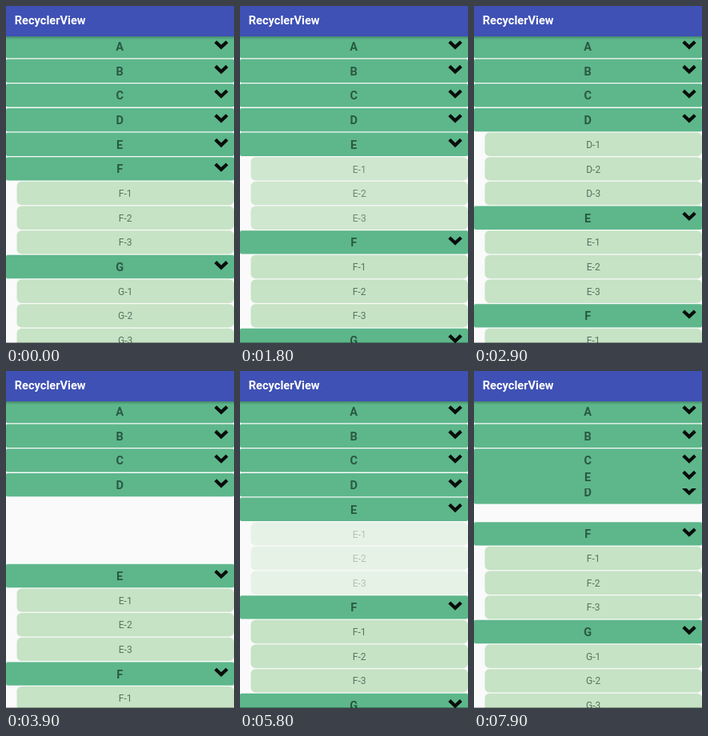
These frames come from a looping animation (285x422 px, 8000 ms). An HTML page with a canvas:

```html
<!DOCTYPE html>
<html lang="en">
<head>
<meta charset="utf-8">
<title>RecyclerView</title>
<style>
  html, body { margin: 0; width: 100%; height: 100%; overflow: hidden; background: #fafafa; }
  canvas { display: block; width: 285px; height: 422px; }
</style>
</head>
<body>
<canvas id="stage" width="285" height="422"></canvas>
<script>
const ctx = document.getElementById('stage').getContext('2d');
const W = 285, H = 422, LOOP = 8000, STEP = 100;
const FIRST = 35.9, PITCH = 30.66, ROW = 29.4;
const MOVE = 250, FADE = 120;
const NAMES = 'ABCDEFGH';

// Groups toggled over time; lead is how far the animation is when first seen
const toggles = [
  { at: 1500, group: 4, open: true, lead: 37 },
  { at: 2500, group: 3, open: true, lead: 69 },
  { at: 3900, group: 3, open: false, lead: 170 },
  { at: 5800, group: 4, open: false, lead: 70 },
];
const DRAG_START = 7700, SWAP_START = 7807;

const clamp = v => Math.max(0, Math.min(1, v));
const ease = v => 0.5 - Math.cos(Math.PI * clamp(v)) / 2;

// Opening: rows move, then children fade in. Closing: children fade out, then rows move.
function groupState(group, t) {
  let state = { space: group >= 5 ? 1 : 0, alpha: group >= 5 ? 1 : 0 };
  for (const e of toggles) {
    if (e.group !== group || t < e.at) continue;
    const p = t - e.at + e.lead;
    state = e.open
      ? { space: ease(p / MOVE), alpha: ease((p - MOVE) / FADE) }
      : { space: 1 - ease((p - FADE) / MOVE), alpha: 1 - ease(p / FADE) };
  }
  return state;
}

function box(x, y, w, h, radius, fill) {
  ctx.fillStyle = fill;
  ctx.beginPath();
  ctx.roundRect(x, y, w, h, radius);
  ctx.fill();
}

function label(text, x, y, font, fill, align = 'center') {
  ctx.font = font + ' Roboto, sans-serif';
  ctx.fillStyle = fill;
  ctx.textAlign = align;
  ctx.fillText(text, x, y);
}

function header(name, y) {
  box(0, y, W, ROW, 2, '#5db78b');
  label(name, 142.2, y + 20.2, 'bold 14.5px', '#2b5842');
  ctx.strokeStyle = '#080c0a';
  ctx.lineWidth = 4.2;
  ctx.beginPath();
  ctx.moveTo(261.8, y + 8.8);
  ctx.lineTo(269, y + 15.7);
  ctx.lineTo(276.3, y + 8.8);
  ctx.stroke();
}

function child(name, y, alpha) {
  ctx.globalAlpha = alpha;
  box(13.5, y, W - 13.5, ROW, 6, '#c6e3c5');
  label(name, 149.2, y + 19.3, '12px', '#587361');
  ctx.globalAlpha = 1;
}

function appBar() {
  const shadow = ctx.createLinearGradient(0, 38, 0, 42);
  shadow.addColorStop(0, 'rgba(0,0,0,.25)');
  shadow.addColorStop(1, 'rgba(0,0,0,0)');
  ctx.fillStyle = shadow;
  ctx.fillRect(0, 38, W, 4);
  ctx.fillStyle = '#3f51b5';
  ctx.fillRect(0, 0, W, 38);
  label('RecyclerView', 10.8, 23.4, 'bold 14.6px', '#fff', 'left');
}

function draw(t) {
  ctx.fillStyle = '#fafafa';
  ctx.fillRect(0, 0, W, H);

  let y = FIRST, dragged = null;
  [...NAMES].forEach((name, i) => {
    const { space, alpha } = groupState(i, t);
    if (name === 'E' && t >= DRAG_START) {
      dragged = y - 41 * (t - DRAG_START + 100) / 300;
    } else {
      header(name, y + (name === 'D' ? PITCH * ease((t - SWAP_START) / MOVE) : 0));
    }
    if (alpha > 0) {
      for (let k = 1; k <= 3; k++) child(name + '-' + k, y + PITCH * k, alpha);
    }
    y += PITCH * (1 + 3 * space);
  });
  if (dragged !== null) header('E', dragged);

  appBar();
  ctx.fillStyle = 'rgba(0,0,0,.3)';
  ctx.fillRect(0, H - 1, W, 1);
}

const start = performance.now();
function tick() {
  const t = (performance.now() - start) % LOOP;
  draw(Math.floor(t / STEP) * STEP);
  requestAnimationFrame(tick);
}
tick();
</script>
</body>
</html>
```
